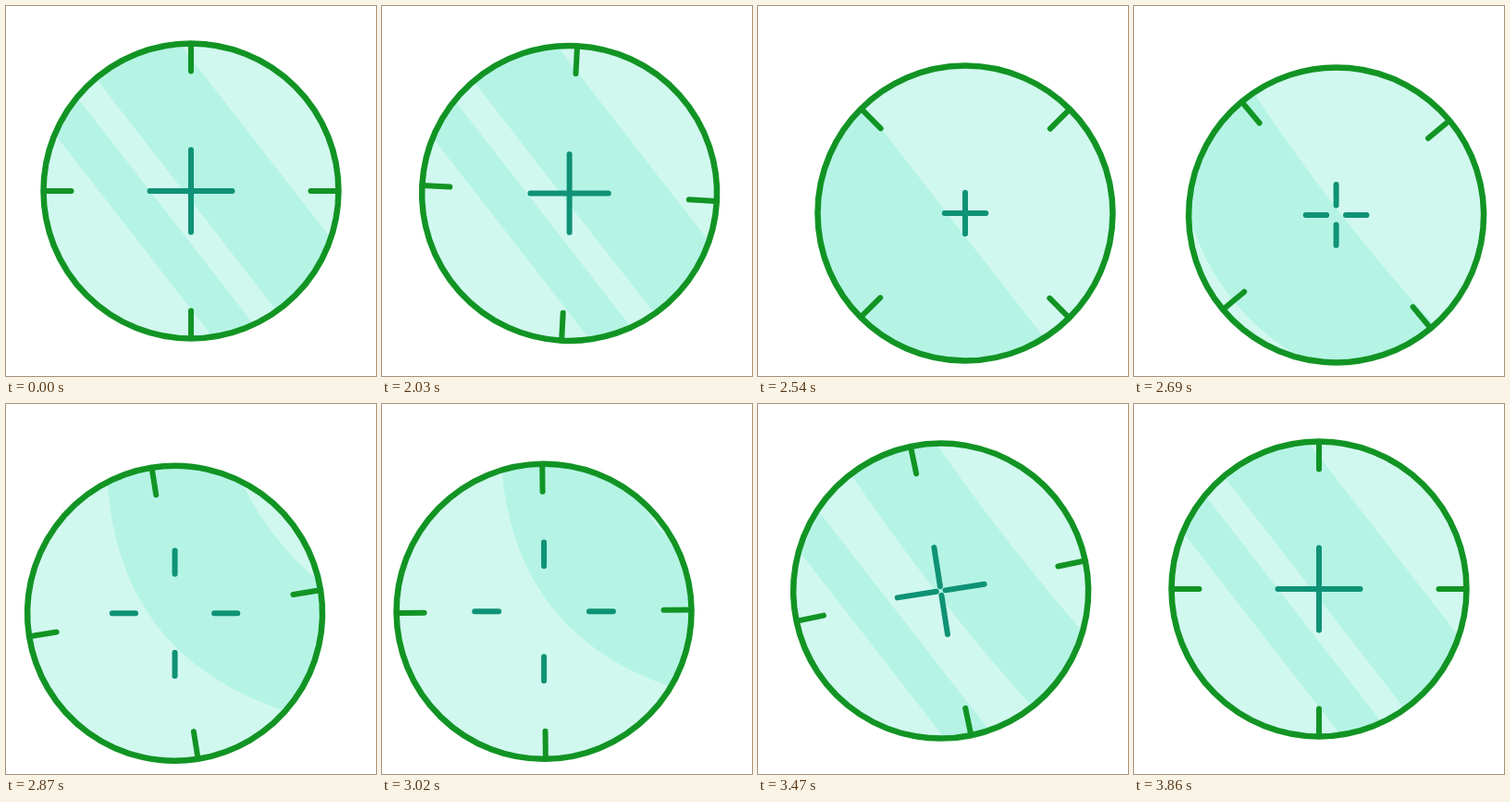
An HTML page that plays this animation: 400x400 px, repeating every 3890 ms.

```html
<!DOCTYPE html>
<html lang="en">
<head>
<meta charset="utf-8">
<title>Crosshair</title>
<style>
  html, body { margin: 0; width: 100%; height: 100%; overflow: hidden; background: #fff; }
  svg { display: block; width: 100vw; height: 100vh; }
  .line { fill: none; stroke-width: 6; stroke-linecap: round; }
  #ring { stroke: #129424; }
  #cross { stroke: #0f9276; }
</style>
</head>
<body>
<svg viewBox="0 0 400 400">
  <clipPath id="lens"><circle r="159.5"/></clipPath>
  <g id="target">
    <circle r="159.5" fill="#d1f8ef"/>
    <g clip-path="url(#lens)">
      <g transform="rotate(52.1)" fill="#b5f4e5">
        <path id="wide"/>
        <path id="thin"/>
      </g>
    </g>
    <path id="cross" class="line"/>
    <g id="ring" class="line">
      <circle r="159.5" stroke-width="6.5"/>
      <path d="M0-159V-129.5M0 159V129.5M-159 0H-129.5M159 0H129.5"/>
    </g>
  </g>
</svg>
<script>
const LOOP = 3890, STEP = 30;
const KEYS = [2000, 2500, 3100, 3720];
const REACH = 170;
const $ = id => document.getElementById(id);

const cubic = (a, b, c, d, s) => {
  const r = 1 - s;
  return a * r * r * r + 3 * b * s * r * r + 3 * c * s * s * r + d * s * s * s;
};

function bezier(x1, y1, x2, y2) {
  return u => {
    if (u <= 0 || u >= 1) return u <= 0 ? 0 : 1;
    let lo = 0, hi = 1;
    for (let i = 0; i < 24; i++) {
      const mid = (lo + hi) / 2;
      if (cubic(0, x1, x2, 1, mid) < u) lo = mid; else hi = mid;
    }
    return cubic(0, y1, y2, 1, lo);
  };
}

const settle = bezier(.385, 0, .1, 1);
const launch = bezier(.25, .4, .4, 1);
const swing = bezier(.7, 0, .3, 1);
const sweep = bezier(.4, 0, .55, 1);

// Value at each key, with one easing per span between keys
const track = (values, eases) => (i, u) =>
  values[i] + (values[i + 1] - values[i]) * eases[i](u);

const ringTurn = track([0, 45, 90, 180], [bezier(.33, .36, .7, 1), swing, bezier(.45, 0, .2, 1)]);
const crossTurn = track([0, 0, 0, 90], [launch, swing, settle]);
const armLength = track([44.5, 22, 26, 44.5], [launch, swing, settle]);
const armGap = track([0, 0, 49.5, 0], [launch, bezier(.56, 0, .24, 1), settle]);

const wideTop = track([88, -16, 155, 88], [sweep, bezier(.74, 0, .1, 1), bezier(.05, .7, .2, 1)]);
const wideBottom = track([-6.5, -165, 12, -6.5], [sweep, swing, settle]);
const topBow = track([0, 0, .0021, 0], [sweep, swing, settle]);
const bottomBow = track([0, .002, .0022, 0], [sweep, swing, settle]);
const thinTop = track([-35, -200, -200, -35], [sweep, swing, settle]);

// Spatial curve followed by the centre: x and y controls per span
const route = [
  { x: [0, 8, 22, 24], y: [0, 8, 16, 24], ease: launch },
  { x: [24, 24, -25, -25], y: [24, 28, 28, 24], ease: bezier(.47, 0, .47, 1) },
  { x: [-25, -24, -7, 0], y: [24, 15, 7, 0], ease: settle }
];

function band(top, bottom, k1, k2) {
  const b1 = k1 * REACH * REACH, b2 = k2 * REACH * REACH;
  return `M${-REACH} ${-top - b1}Q0 ${-top + b1} ${REACH} ${-top - b1}` +
    `V${-bottom - b2}Q0 ${-bottom + b2} ${-REACH} ${-bottom - b2}Z`;
}

function draw(time) {
  const t = Math.max(KEYS[0], KEYS[0] + STEP * Math.floor((time - KEYS[0]) / STEP));
  const i = t < KEYS[1] ? 0 : t < KEYS[2] ? 1 : 2;
  const u = Math.min(1, (t - KEYS[i]) / (KEYS[i + 1] - KEYS[i]));
  const at = fn => fn(i, u);

  const { x, y, ease } = route[i], p = ease(u);
  $("target").setAttribute("transform", `translate(${200 + cubic(...x, p)} ${200 + cubic(...y, p)})`);
  $("ring").setAttribute("transform", `rotate(${at(ringTurn)})`);

  const a = at(armGap), b = a + at(armLength);
  $("cross").setAttribute("d", `M0 ${-a}V${-b}M0 ${a}V${b}M${-a} 0H${-b}M${a} 0H${b}`);
  $("cross").setAttribute("transform", `rotate(${at(crossTurn)})`);

  $("wide").setAttribute("d", band(at(wideTop), at(wideBottom), at(topBow), at(bottomBow)));
  const edge = at(thinTop);
  $("thin").setAttribute("d", band(edge, edge - 43.5, 0, 0));
}

const start = performance.now();
function tick() {
  draw((performance.now() - start) % LOOP);
  requestAnimationFrame(tick);
}
tick();
</script>
</body>
</html>
```
